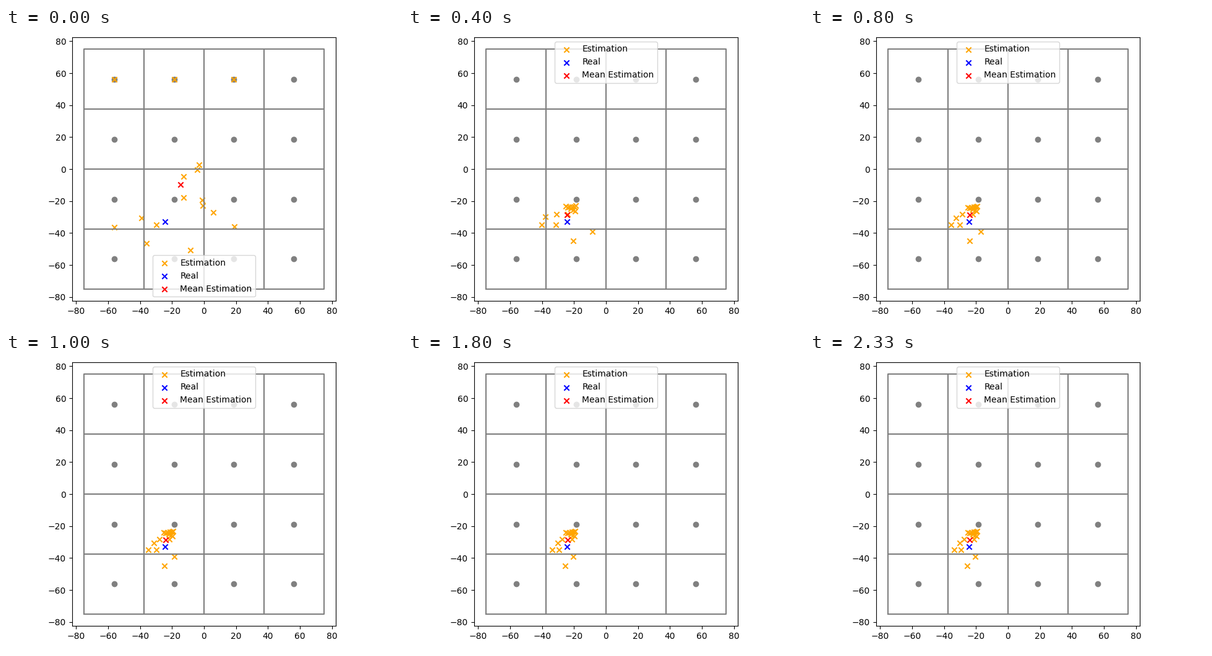
Write a matplotlib script that moves like this. It is 640 px wide and 480 px high and loops after 2430 ms.

```python
import numpy as np
import matplotlib.pyplot as plt
from matplotlib.animation import FuncAnimation

W, H, DPI = 640, 480, 100
TICK, LOOP = 10, 2430                # ms
CX, CY, SIDE = 320, 228.14, 426.28   # plot area in pixels
LIMIT = 82.5
CELL, EDGE = 37.5, 75
REAL = (-24.3, -33.0)
FAST, SLOW = 0.3, 0.74               # share of the distance left after a step


def to_data(points):
    """Stage pixels (y down) to plot units."""
    scale = SIDE / (2 * LIMIT)
    return (np.array(points, float) - (CX, CY)) / (scale, -scale)


# Stragglers end spread out, the rest gather in a tight zigzag
straggler_start = [(175, 83), (175, 322), (227, 348), (298, 359),
                   (369, 321), (219, 307), (243, 318)]
straggler_end = [(242, 307), (233, 318), (244, 318), (254, 344),
                 (267, 329), (249, 301), (265, 301)]
group_start = [(272, 83), (287, 240), (287, 274), (312, 221), (309, 229),
               (317, 278), (318, 287), (335, 298), (368, 83)]

i = np.arange(len(group_start))
group_end = np.column_stack([270 - 15 * (1 - i / 8) ** 1.6,
                             290 + 0.35 * i - 0.55 * i * (-1.0) ** i])

start = to_data(straggler_start + group_start)
end = to_data(np.vstack([straggler_end, group_end]))
rate = np.full(start.shape, FAST)
rate[:len(straggler_start), 0] = SLOW


def swarm(step):
    return end + (start - end) * rate ** step


def step_at(ms):
    """A step every 100 ms; the last one comes early."""
    return 24 if ms >= 2330 else ms // 100


fig = plt.figure(figsize=(W / DPI, H / DPI), dpi=DPI)
ax = fig.add_axes([(CX - SIDE / 2) / W, 1 - (CY + SIDE / 2) / H, SIDE / W, SIDE / H])
ax.set(xlim=(-LIMIT, LIMIT), ylim=(-LIMIT, LIMIT))
ticks = range(-80, 81, 20)
ax.set_xticks(ticks)
ax.set_yticks(ticks)

corners = np.arange(-EDGE, EDGE, CELL)
for x in corners:
    for y in corners:
        r, t = x + CELL, y + CELL
        ax.plot([x, r, r, x, x], [y, y, t, t, y], color="grey")
gx, gy = np.meshgrid(corners + CELL / 2, corners + CELL / 2)
ax.scatter(gx.ravel(), gy.ravel(), color="grey")

estimates = ax.scatter(*start.T, color="orange", marker="x", label="Estimation")
ax.scatter(*REAL, color="blue", marker="x", label="Real")
mean = ax.scatter(*start.mean(axis=0), color="red", marker="x", label="Mean Estimation")
legend = ax.legend(loc="lower center")


def update(frame):
    step = step_at(frame * TICK)
    points = swarm(step)
    estimates.set_offsets(points)
    mean.set_offsets(points.mean(axis=0))
    legend.set_loc("upper center" if step else "lower center")
    return estimates, mean, legend


anim = FuncAnimation(fig, update, frames=LOOP // TICK, interval=TICK,
                     repeat=True, repeat_delay=0)
plt.show()
```
